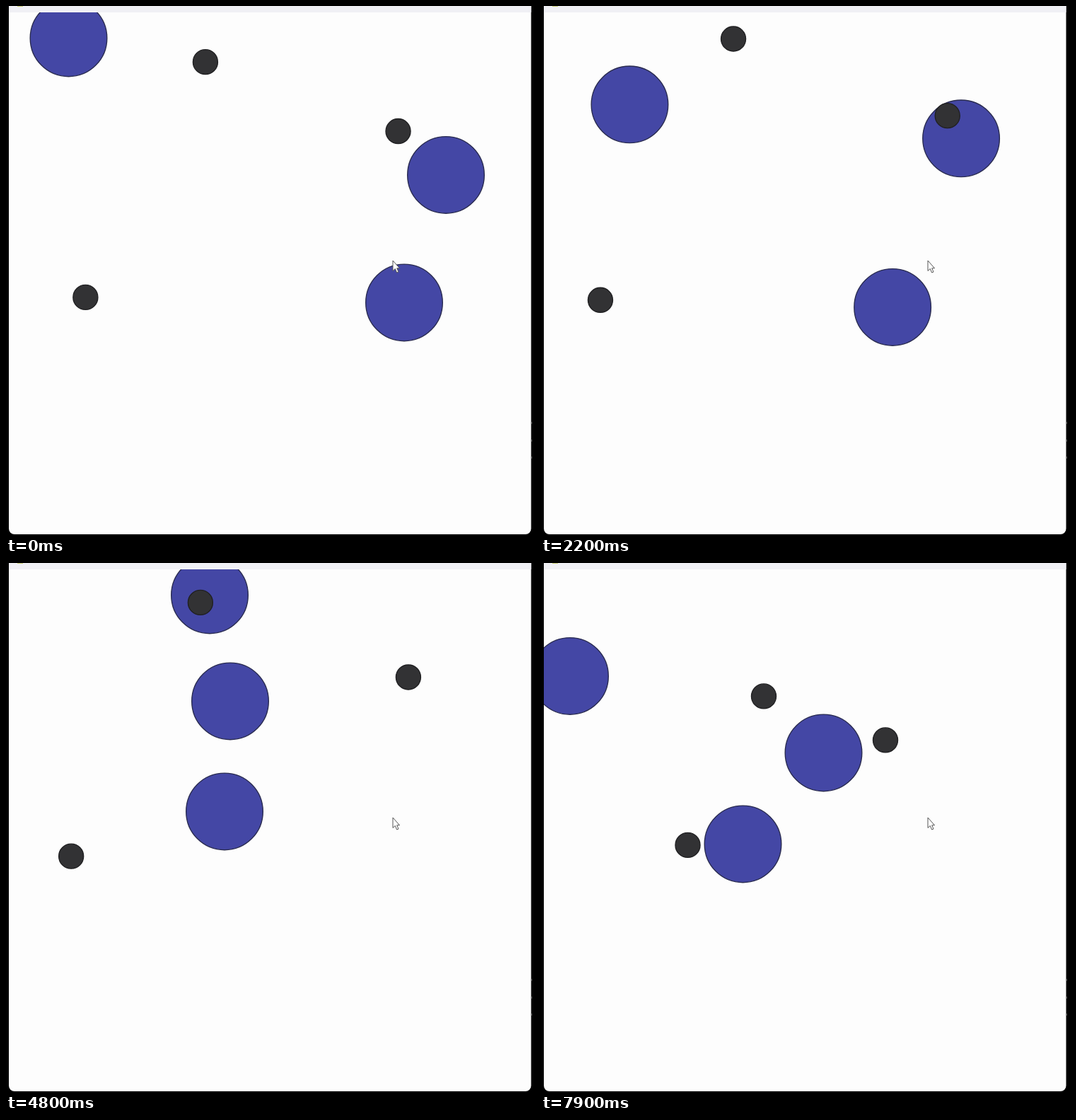
An HTML page with a canvas that plays this animation: 748x748 px, repeating every 8 s.

```html
<!DOCTYPE html>
<html lang="en">
<head>
<meta charset="utf-8">
<title>Drifting circles</title>
<style>
  html, body { margin: 0; width: 100%; height: 100%; overflow: hidden; background: #000; }
  canvas { display: block; }
</style>
</head>
<body>
<canvas id="stage" width="748" height="748"></canvas>
<script>
const ctx = document.getElementById('stage').getContext('2d');
const LOOP = 8000, STEP = 100;
const HELD = [14, 55];        // steps on which the motion pauses
const END = 7.7;              // motion clock at the last step, in seconds
const WALL = { x: 41, y: 45 };

// Turning points of each big circle; those beyond the walls are held at them.
const turns = [0, 1.4, 2.7, 4.7, 5.8, 7, END];
const drifters = [
  { x: [88.5, 90.5, 173.5, 317, 341.5, 393, 399.5], y: [45, 71, 187, 195, 212, 216, 268] },
  { x: [622, 643, 523, 288, 171.5, 0, 0], y: [238.5, 223.5, 143.5, 20, -10, 89, 159.5] },
  { x: [563, 577, 411, 309, 299, 269, 285.5], y: [419, 425.5, 425.5, 351, 368, 368, 397] }
];

// Dots leave their rest position along a line towards the middle.
const dots = [
  { x: 271.7, y: 45, dx: 43.3, dy: 143 },
  { x: 575.4, y: 154, dx: -88.4, dy: 96 },
  { x: 83, y: 415.5, dx: 124.5, dy: -17 }
];

// Settle quickly, then accelerate exponentially.
const dotProgress = t =>
  Math.max(0.236 * Math.max(0, 1 - t / 1.4) ** 2, Math.exp(0.87 * (t - END)));

// Monotone cubic through the turning points, without overshoot.
function drift(values, t) {
  const last = turns.length - 1;
  const i = Math.min(turns.findLastIndex(at => at <= t), last - 1);
  const slope = j => (values[j + 1] - values[j]) / (turns[j + 1] - turns[j]);
  const tangent = j => {
    const a = slope(Math.max(j - 1, 0)), b = slope(Math.min(j, last - 1));
    return a * b > 0 ? 2 * a * b / (a + b) : 0;
  };
  const h = turns[i + 1] - turns[i], u = (t - turns[i]) / h, v = 1 - u;
  return values[i] * v * v * (1 + 2 * u) + values[i + 1] * u * u * (3 - 2 * u)
       + h * u * v * (tangent(i) * v - tangent(i + 1) * u);
}

function disc(x, y, r, fill, line) {
  ctx.beginPath();
  ctx.arc(x, y + 0.4, r, 0, 2 * Math.PI);
  ctx.fillStyle = fill;
  ctx.fill();
  ctx.strokeStyle = line;
  ctx.lineWidth = 1.4;
  ctx.stroke();
}

function rect(color, x, y, w, h) {
  ctx.fillStyle = color;
  ctx.fillRect(x, y, w, h);
}

function drawCursor() {
  const shape = new Path2D('M547 360V374.5L550.3 371.5L552.6 377L555 376L552.7 370.8H556.5Z');
  ctx.fillStyle = '#fff';
  ctx.fill(shape);
  ctx.strokeStyle = '#555';
  ctx.lineWidth = 1;
  ctx.stroke(shape);
}

function draw(t) {
  rect('#000', 0, 0, 748, 748);
  for (const y of [588, 613, 637]) rect('#555', 743, y, 1, 3);
  ctx.save();
  ctx.beginPath();
  ctx.roundRect(4, -20, 738.5, 767, 8);
  ctx.clip();
  rect('#fdfdfd', 0, 0, 748, 748);
  for (const { x, y } of drifters)
    disc(Math.max(WALL.x, drift(x, t)), Math.max(WALL.y, drift(y, t)), 54.3, '#4447a5', '#292b50');
  const k = dotProgress(t);
  for (const { x, y, dx, dy } of dots)
    disc(x + dx * k, y + dy * k, 17.5, '#323234', '#202022');
  rect('#f0f0f5', 0, 0, 748, 9);
  rect('#c9cd72', 16, 0, 8, 1);
  ctx.restore();
  drawCursor();
}

function tick() {
  const step = Math.floor(performance.now() % LOOP / STEP);
  const pauses = HELD.filter(at => step >= at).length;
  draw((step - pauses) * STEP / 1000);
  requestAnimationFrame(tick);
}
tick();
</script>
</body>
</html>
```
